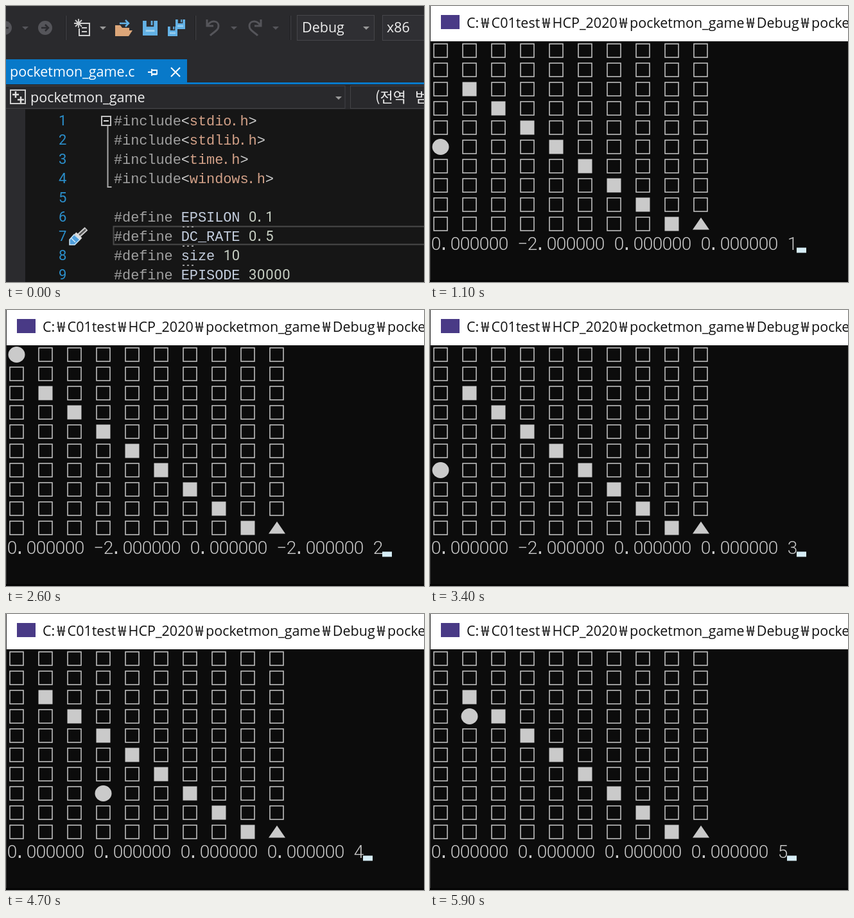
These frames come from a looping animation (651 by 430 pixels, 6000 ms). An HTML page with a canvas:

```html
<!DOCTYPE html>
<html lang="ko">
<meta charset="utf-8">
<title>Grid walk</title>
<style>
html, body { margin: 0; width: 100%; height: 100%; overflow: hidden; background: #0c0c0c; }
canvas { display: block; }
</style>
<canvas id="stage" width="651" height="430"></canvas>
<script>
const ctx = document.getElementById('stage').getContext('2d');
const LOOP = 6000, TICK = 100, CLEARED = 52;
const UI = '21.5px "Open Sans", "Noto Sans", "Noto Sans CJK KR", sans-serif';
const KOREAN = '22px "Noto Sans CJK KR", "Noto Sans CJK", sans-serif';

// Walker waypoints: tick, column, row, episode
const WALK = [
  [1, 0, 0, 0], [5, 0, 8, 0], [7, 2, 8, 0],
  [8, 0, 0, 1], [11, 0, 5, 1], [12, 2, 5, 1],
  [13, 0, 0, 2], [15, 0, 3, 2], [18, 0, 1, 2], [19, 1, 1, 2], [21, 3, 1, 2],
  [23, 1, 1, 2], [25, 0, 1, 2], [26, 0, 0, 2], [28, 0, 3, 2], [30, 1, 3, 2],
  [31, 0, 0, 3], [34, 0, 6, 3], [36, 3, 6, 3],
  [37, 0, 0, 4], [42, 0, 9, 4], [44, 3, 9, 4], [49, 3, 5, 4],
  [50, 0, 0, 5], [54, 0, 6, 5], [56, 0, 0, 5], [58, 0, 3, 5], [59, 1, 3, 5]
];

function rect(x, y, w, h, color) {
  ctx.fillStyle = color;
  ctx.fillRect(x, y, w, h);
}

function frame(x, y, w, h, color, width = 1) {
  ctx.strokeStyle = color;
  ctx.lineWidth = width;
  ctx.strokeRect(x, y, w, h);
}

function stroke(d, color, width = 2) {
  ctx.strokeStyle = color;
  ctx.lineWidth = width;
  ctx.stroke(new Path2D(d));
}

function fill(d, color) {
  ctx.fillStyle = color;
  ctx.fill(new Path2D(d));
}

function label(text, x, y, color, font = UI, align = 'left') {
  ctx.font = font;
  ctx.textAlign = align;
  ctx.fillStyle = color;
  ctx.fillText(text, x, y);
}

// One character per cell; digits use a face with a plain zero
function cells(text, x, y, pitch, size, color, weight = 400) {
  [...text].forEach((ch, i) => {
    const face = /[\d−]/.test(ch) ? `${weight} ${size}px Roboto, sans-serif`
                                  : `${size}px "Liberation Mono", monospace`;
    const shift = ch === '.' ? -pitch * 0.2 : 0;
    label(ch, x + (i + 0.5) * pitch + shift, y, color, face, 'center');
  });
}

const dropArrow = (x, y, color) => fill(`M${x - 5} ${y - 2}h10l-5 5z`, color);

function floppy(x, y, s) {
  rect(x, y, s, s, '#63b1e5');
  rect(x + s * 0.25, y, s * 0.5, s * 0.4, '#2d2d30');
  rect(x + s * 0.55, y, s * 0.12, s * 0.3, '#63b1e5');
  rect(x + s * 0.2, y + s * 0.62, s * 0.6, s * 0.12, '#a8d6f0');
}

function drawToolbar() {
  const dim = '#55555a', light = '#d0d0d0';
  rect(0, 0, 651, 123, '#2a2a2d');
  for (const x of [-2, 61]) {
    fill(`M${x - 11} 34a11 11 0 1 0 22 0a11 11 0 1 0 -22 0`, dim);
    stroke(x < 0 ? 'M4 34h-12' : 'M55 34h11m-5-5l5 5l-5 5', '#2b2b2f', 2.5);
  }
  for (const x of [30, 355, 420]) dropArrow(x, 34, dim);
  dropArrow(151, 34, '#999');
  for (const x of [92, 294, 442]) {
    rect(x, 15, 1, 38, '#1d1d1f');
    rect(x + 1, 15, 1, 38, '#46464a');
  }

  stroke('M119 27h11v19h-16v-11M118 34h8M118 40h8', light);
  stroke('M113 20v14M106 27h14M108 22l10 10M118 22l-10 10', light, 1.8);
  fill('M170 30h8l3 4h11v4h-14l-6 9h-2zM178 38h19l-6 9h-19z', '#dca679');
  stroke('M177 27h14m-5-5l5 5l-5 5', '#63b1e5', 2.5);
  floppy(213, 23, 23);
  floppy(264, 21, 15);
  floppy(252, 32, 15);
  stroke('M313 21v10h10M314 30c6-9 17-7 17 1c0 7-7 9-13 15', dim, 3);
  stroke('M397 21v10h-10M396 30c-6-9-17-7-17 1c0 7 7 9 13 15', dim, 3);

  for (const [x, w] of [[453.5, 120], [586.5, 80]]) {
    rect(x, 14, w, 40, '#2f2f33');
    frame(x, 14.5, w, 39, '#46464a');
  }
  label('Debug', 461, 41, '#eee');
  label('x86', 593, 41, '#eee');
  dropArrow(561, 34, '#999');
}

function drawTabs() {
  rect(0, 83, 282, 39, '#0879c9');
  rect(0, 119, 651, 3, '#0879c9');
  label('pocketmon_game.c', 6, 110, '#fff');
  stroke('M221 103h6M227 98v11M228 100h7v6h-7M228 106.500h7', '#fff', 1.8);
  stroke('M257 96l14 14M271 96l-14 14', '#fff', 2);

  rect(0, 122, 651, 39, '#29292c');
  frame(-1, 124.5, 529, 35, '#434346');
  frame(536.5, 124.5, 130, 35, '#434346');
  frame(7, 131, 23, 21, '#ccc', 2);
  stroke('M10 138h10M15 133v10M18 146h10M23 141v10', '#ddd', 2.5);
  label('pocketmon_game', 38, 150, '#eee');
  dropArrow(518, 143, '#999');
  label('(전역', 575, 150, '#eee', KOREAN);
  label('범', 637, 150, '#eee', KOREAN);
}

function drawCode() {
  const gray = '#a0a0a0', number = '#c8d0c4', string = '#d3a188';
  rect(0, 161, 651, 269, '#161616');
  rect(0, 161, 30, 269, '#2b2b2e');
  frame(167.5, 343.5, 500, 28, '#4a4a4a', 2);
  const lines = ['stdio.h', 'stdlib.h', 'time.h', 'windows.h', '',
    'EPSILON 0.1', 'DC_RATE 0.5', 'size 10', 'EPISODE 30000'];
  lines.forEach((line, i) => {
    const y = 186 + 30 * i, pitch = 13.1;
    const put = (text, column, color) => cells(text, 168 + column * pitch, y, pitch, 22, color);
    put(String(i + 1), -6.6, '#2b8fcb');
    if (line.endsWith('.h')) {
      put('#include', 0, gray);
      put('<', 8, '#ccc');
      put(line, 9, string);
      put('>', 9 + line.length, '#ccc');
    } else if (line) {
      const [name, value] = line.split(' ');
      put('#define', 0, gray);
      put(name, 8, '#c3cddd');
      put(value, 9 + name.length, number);
      for (let k = 0; k < 3; k++) rect(275 + 7 * k, y + 7, 3, 2, '#999');
    }
  });
  frame(149, 172, 14, 14, '#c0c0c0', 2);
  stroke('M152 179h8', '#ddd', 2);
  stroke('M158.500 187v95h6', '#aaa', 2);
  stroke('M113 358L125 347', '#ccc', 7);
  stroke('M114 357L124 348', '#555', 2.5);
  stroke('M108 354l9 9', '#ddd', 4);
  fill('M106 356l9 8l-8 8h-8v-8z', '#4f9fdc');
  stroke('M106 356l9 8l-8 8h-8v-8zM102 362l6 6', '#cfe6f5', 1.5);
}

function drawEditor() {
  drawToolbar();
  drawTabs();
  drawCode();
}

function drawTitle() {
  rect(1, 0, 650, 55, '#fff');
  rect(17, 14, 29, 22, '#493a86');
  let x = 57;
  'C:₩C01test₩HCP_2020₩pocketmon_game₩Debug₩pocke'.split('₩').forEach((part, i) => {
    if (i) {
      label('₩', x + 9.5, 34, '#111', KOREAN, 'center');
      x += 19.3;
    }
    label(part, x, 34, '#111');
    x += ctx.measureText(part).width;
  });
}

function walkerAt(tick) {
  const i = WALK.findLastIndex(point => point[0] <= tick);
  const [t, col, row, episode] = WALK[i];
  const [t2, col2, row2] = WALK[i + 1] || [t + 1, col, row];
  const k = (tick - t) / (t2 - t);
  return { col: Math.round(col + (col2 - col) * k), row: Math.round(row + (row2 - row) * k), episode };
}

function drawBoard(walker) {
  const ink = '#cacaca';
  for (let row = 0; row < 10; row++) {
    for (let col = 0; col < 10; col++) {
      const x = 16.5 + 45 * col, y = 69.5 + 30 * row;
      if (col === walker.col && row === walker.row) {
        ctx.beginPath();
        ctx.ellipse(x, y, 13, 12.5, 0, 0, Math.PI * 2);
        ctx.fillStyle = ink;
        ctx.fill();
      } else if (col === 9 && row === 9) {
        fill(`M${x - 12.5} ${y + 9}h26l-13 -19z`, ink);
      } else if (col > 0 && row === col + 1) {
        rect(x - 11, y - 11, 22, 22, ink);
      } else {
        frame(x - 10.5, y - 10.5, 21, 21, ink, 1.5);
      }
    }
  }
}

function drawConsole(tick) {
  const walker = walkerAt(tick);
  rect(0, 0, 651, 430, '#0c0c0c');
  rect(0, 0, 1, 430, '#333');
  rect(0, 427, 651, 3, '#050505');
  drawTitle();
  // Values for right, left, down, up: leaving the board costs 2
  const edges = [walker.col === 9, walker.col === 0, walker.row === 9, walker.row === 0];
  const text = edges.map(out => out ? '−2.000000' : '0.000000').join(' ') + ' ' + walker.episode;
  if (tick !== CLEARED) {
    drawBoard(walker);
    cells(text, 2, 380, 15, 28, '#cacaca', 300);
  }
  rect(text.length * 15 + 1, 376.5, 15, 8, '#d6edf6');
}

let shown = -1;
function draw(now) {
  const tick = Math.floor(now % LOOP / TICK);
  if (tick !== shown) {
    shown = tick;
    if (tick === 0) drawEditor();
    else drawConsole(tick);
  }
  requestAnimationFrame(draw);
}
draw(0);
</script>
</html>
```
